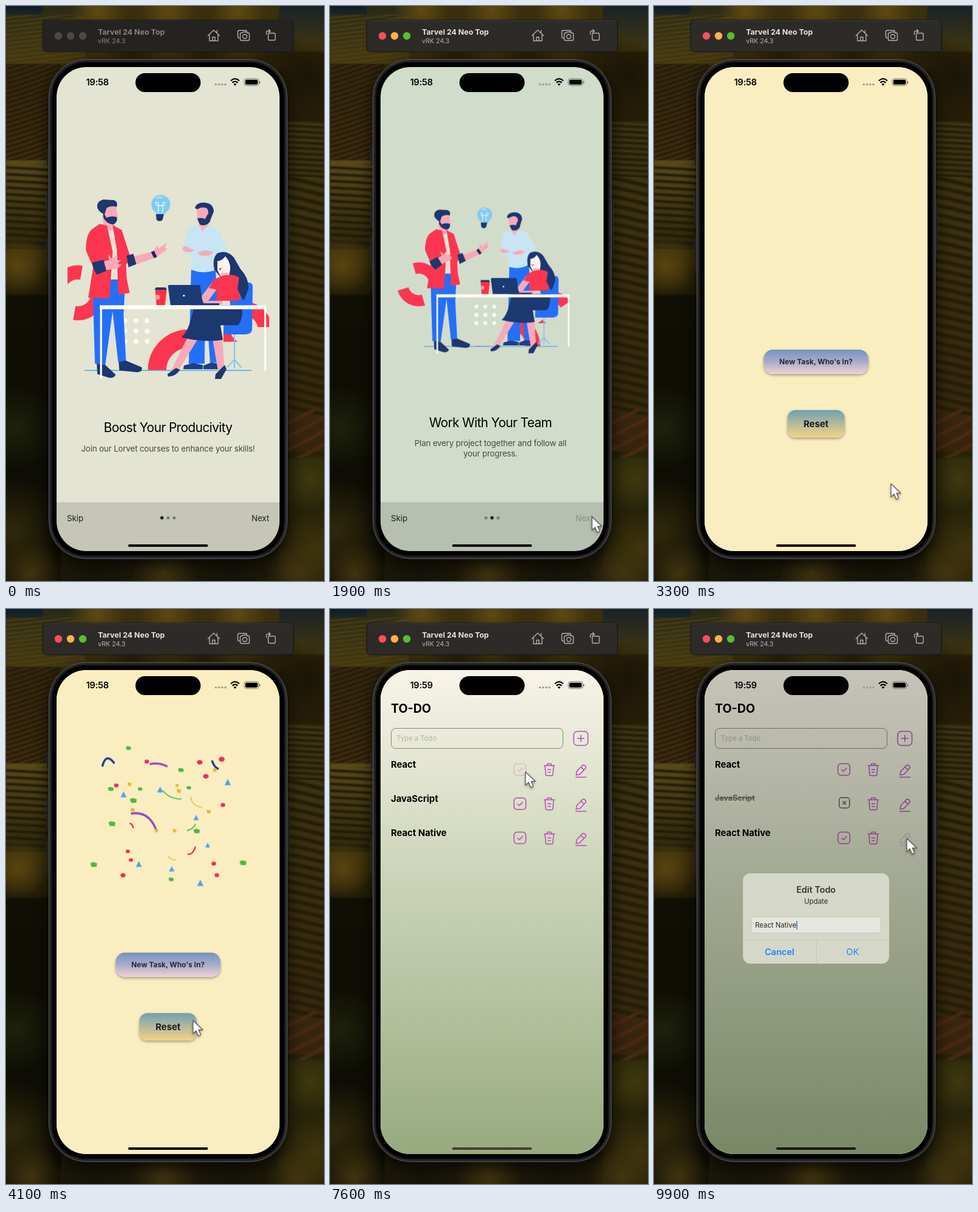
Write an HTML page with a canvas that moves like this. It is 522x942 px and loops after 10000 ms.

```html
<!DOCTYPE html>
<html lang="en">
<head>
<meta charset="utf-8">
<title>Onboarding and to-do app demo</title>
<style>
html, body { margin: 0; width: 100%; height: 100%; overflow: hidden; background: #0d0f05 }
canvas, svg { position: absolute; left: 0; top: 0; display: block }
text { font-family: Inter, "Open Sans", sans-serif }
.mid { text-anchor: middle }
.b { font-weight: 700 }
.s { font-weight: 600 }
.h1 { font-size: 20.8px; letter-spacing: -.6px }
.sub { font-size: 13.2px; letter-spacing: -.12px; fill: #45473f }
.nav { font-size: 13.2px; fill: #1e1f1b }
.item { font-size: 14.8px; font-weight: 700 }
.ico { fill: none; stroke: #b04db2; stroke-width: 1.5; stroke-linecap: round; stroke-linejoin: round }
.tool { fill: none; stroke: #b3b0ab; stroke-width: 1.4; stroke-linejoin: round; stroke-linecap: round }
.anim, .bit { animation: 10s linear infinite }
.step { animation: 10s step-end infinite }

.idle { animation-name: idle }
.live { animation-name: live }
@keyframes idle { 0% { opacity: 1 } 9%, 100% { opacity: 0 } }
@keyframes live { 0% { opacity: 0 } 9%, 100% { opacity: 1 } }

.pages { animation-name: pages; animation-timing-function: ease-in-out }
.tone { animation-name: tone }
.dot { animation-name: dot }
.skip { animation-name: skip }
.next { animation-name: next }
.done { animation-name: done }
@keyframes pages {
  0%, 12.39% { transform: none }
  15.89%, 18.8% { transform: translate(-366px) }
  22.3%, 100% { transform: translate(-732px) }
}
@keyframes tone { 0%, 13.2% { fill: #e3e4d2 } 16%, 19.2% { fill: #d2dccb } 22.3%, 100% { fill: #adc5af } }
@keyframes dot { 0% { transform: none } 15% { transform: translate(10px) } 21%, 100% { transform: translate(20px) } }
@keyframes skip { 0% { opacity: 1 } 21%, 100% { opacity: 0 } }
@keyframes next { 0% { opacity: 1 } 12.2% { opacity: .3 } 14% { opacity: 1 } 18.6% { opacity: .3 } 20% { opacity: 1 } 21%, 100% { opacity: 0 } }
@keyframes done { 0% { opacity: 0 } 21% { opacity: 1 } 26.6% { opacity: .3 } 28%, 100% { opacity: 1 } }

.ring { animation-name: ring; transform-origin: 118px 470px }
.arch { animation-name: arch; transform-origin: 300px 597px }
.curl { animation-name: curl; transform-origin: 391px 530px }
.bulb { animation-name: bulb }
.arm { animation-name: arm; transform-origin: 205px 418px }
.hand { animation-name: hand; transform-origin: 150px 428px }
.lean { animation-name: lean; transform-origin: 325px 450px }
.grid { animation-name: grid }
@keyframes ring { to { transform: rotate(333deg) } }
@keyframes arch { 13% { transform: rotate(85deg) } 24% { transform: rotate(95deg) } 34%, 100% { transform: rotate(180deg) } }
@keyframes curl { 13% { transform: rotate(105deg) } 24%, 100% { transform: rotate(180deg) } }
@keyframes bulb { 13% { transform: translate(1px, 13px) } 24% { transform: translate(-2px, -6px) } 34%, 100% { transform: none } }
@keyframes arm { 13% { transform: rotate(-17deg) } 24% { transform: rotate(3deg) } 34%, 100% { transform: none } }
@keyframes hand { 13% { transform: rotate(-5deg) } 24% { transform: rotate(-24deg) } 34%, 100% { transform: none } }
@keyframes lean { 13% { transform: rotate(-6deg) } 24% { transform: rotate(-5deg) } 34%, 100% { transform: none } }
@keyframes grid { 13% { transform: translate(38px) } 24%, 100% { transform: translate(44px) } }

.intro { animation-name: intro }
.home { animation-name: home }
.todo { animation-name: todo }
.intro, .home, .todo { animation-timing-function: cubic-bezier(.2, .8, .3, 1) }
@keyframes intro { 0%, 28% { transform: none } 32.5%, 100% { transform: translate(-110px) } }
@keyframes home { 0%, 28% { transform: translate(366px) } 32.5%, 52% { transform: none } 56.5%, 100% { transform: translate(-110px) } }
@keyframes todo { 0%, 52% { transform: translate(366px) } 56.5%, 100% { transform: none } }

.bit { animation-name: fly }
.ribbons { animation-name: spread }
.bit, .ribbons { animation-timing-function: ease-out }
@keyframes fly {
  0%, 33% { transform: scale(0); opacity: 0 }
  34% { opacity: 1 }
  41% { transform: translate(var(--x), var(--y)); opacity: 1 }
  45% { opacity: 1 }
  48%, 100% { transform: translate(calc(var(--x) * 1.12), calc(var(--y) * 1.1 + 45px)); opacity: 0 }
}
@keyframes spread {
  0%, 33% { transform: scale(0); opacity: 0 }
  34% { opacity: 1 }
  41% { transform: none; opacity: 1 }
  45% { opacity: 1 }
  48%, 100% { transform: translate(0, 45px) scale(1.12); opacity: 0 }
}

.t1 { animation-name: t1 }
.t2 { animation-name: t2 }
.bar { animation-name: bar }
@keyframes t1 { 0% { opacity: 1 } 65%, 100% { opacity: 0 } }
@keyframes t2 { 0% { opacity: 0 } 65%, 100% { opacity: 1 } }
@keyframes bar { 0% { fill: #000 } 54% { fill: #463e33 } 95%, 100% { fill: #1a1712 } }

.open0 { animation-name: open0 }
.open1 { animation-name: open1 }
.over0 { animation-name: over0 }
.over1 { animation-name: over1 }
.tap0 { animation-name: tap0 }
.edit2 { animation-name: edit2 }
@keyframes open0 { 0% { opacity: 1 } 77% { opacity: 0 } 82%, 100% { opacity: 1 } }
@keyframes over0 { 0% { opacity: 0 } 77% { opacity: 1 } 82%, 100% { opacity: 0 } }
@keyframes open1 { 0% { opacity: 1 } 87%, 100% { opacity: 0 } }
@keyframes over1 { 0% { opacity: 0 } 87%, 100% { opacity: 1 } }
@keyframes tap0 { 0% { opacity: 1 } 75.5% { opacity: .25 } 77%, 100% { opacity: 1 } }
@keyframes edit2 { 0% { opacity: 1 } 94%, 100% { opacity: .3 } }

.dim { animation-name: dim }
.alert { animation-name: alert; transform-origin: 266px 507px }
@keyframes dim { 0%, 94.5% { opacity: 0 } 96.5%, 100% { opacity: 1 } }
@keyframes alert { 0%, 94.5% { opacity: 0; transform: scale(1.15) } 96.5%, 100% { opacity: 1; transform: none } }

.cursor { animation-name: cursor; animation-timing-function: ease-in-out }
@keyframes cursor {
  0%, 7% { transform: translate(530px, 935px) }
  11%, 13% { transform: translate(433px, 835px) }
  20%, 29% { transform: translate(430px, 837px) }
  39%, 42% { transform: translate(307px, 674px) }
  48%, 66% { transform: translate(288px, 571px) }
  71%, 81.5% { transform: translate(321px, 267px) }
  85%, 88% { transform: translate(320px, 320px) }
  92.5%, 100% { transform: translate(415px, 376px) }
}
</style>
</head>
<body>
<canvas id="wall" width="522" height="942"></canvas>
<svg width="522" height="942" viewBox="0 0 522 942">
<defs>
  <clipPath id="screen"><rect x="83" y="100" width="366" height="793" rx="49"/></clipPath>
  <clipPath id="crop"><rect x="101" y="280" width="331" height="340"/></clipPath>
  <clipPath id="floor"><rect x="200" y="500" width="240" height="97"/></clipPath>
  <clipPath id="seat"><path d="M357 480H440V526H405V550H357Z"/></clipPath>
  <linearGradient id="sky" x2="0" y2="1">
    <stop stop-color="#f8f4e8"/><stop offset=".4" stop-color="#ced6bb"/>
    <stop offset=".75" stop-color="#afbd99"/><stop offset="1" stop-color="#98a97f"/>
  </linearGradient>
  <linearGradient id="task" x2="0" y2="1"><stop stop-color="#7394bf"/><stop offset=".5" stop-color="#a9acca"/><stop offset="1" stop-color="#efd3d4"/></linearGradient>
  <linearGradient id="reset" x2="0" y2="1"><stop stop-color="#6ca2b2"/><stop offset=".55" stop-color="#bdbb98"/><stop offset="1" stop-color="#f2d488"/></linearGradient>
  <filter id="drop" x="-20%" y="-20%" width="140%" height="160%"><feDropShadow dx="0" dy="2" stdDeviation="2" flood-opacity=".35"/></filter>
</defs>

<!-- simulator toolbar -->
<rect x="60" y="23" width="412" height="52" rx="6" fill="#2d2b28" stroke="#11100e"/>
<path d="M65 24H467" stroke="#4a4844" stroke-width=".8"/>
<g class="step idle">
  <rect x="60.5" y="23.5" width="411" height="51" rx="6" fill="#242321"/>
  <g fill="#4b4a48"><circle cx="86" cy="49" r="6.200"/><circle cx="106" cy="49" r="6.200"/><circle cx="126" cy="49" r="6.200"/></g>
</g>
<g class="step live">
  <circle cx="86" cy="49" r="6.200" fill="#fd4f5b"/><circle cx="106" cy="49" r="6.200" fill="#fdb04c"/><circle cx="126" cy="49" r="6.200" fill="#58bc36"/>
</g>
<g id="label">
  <text class="b" x="151" y="47" font-size="12.4">Tarvel 24 Neo Top</text>
  <text x="151" y="61" font-size="10.6">vRK 24.3</text>
</g>
<g class="tool">
  <path d="M331.5 48.500L341 39.500L350.500 48.500M334 47V57H348V47M346.500 43.500V40M339 57V51H343V57"/>
  <path d="M383 52.500Q380.500 52.500 380.500 50V42.500Q380.500 40 383 40H393Q395.500 40 395.500 42"/>
  <path d="M384.500 46Q384.500 44 386.500 44H388L389.500 42.500H394L395.500 44H397.500Q399.500 44 399.500 46V54Q399.500 56.500 397.500 56.500H386.500Q384.500 56.500 384.500 54Z"/><circle cx="392" cy="50" r="3.500"/>
  <rect x="430.500" y="44.500" width="11.500" height="11.500" rx="1.500"/><path d="M427.500 46.500V43Q427.500 41 430 41H434M431.500 38.500L434 41L431.500 43.500"/>
</g>

<!-- phone body -->
<g fill="#1c1c1c" stroke="#3a3a38" stroke-width=".6">
  <rect x="67" y="234" width="5" height="28" rx="1.500"/><rect x="67" y="304" width="5" height="56" rx="1.500"/><rect x="67" y="377" width="5" height="55" rx="1.500"/><rect x="460" y="318" width="5" height="84" rx="1.500"/>
</g>
<rect x="70.500" y="87.500" width="391" height="818" rx="61" fill="#242425" stroke="#5c5c5b"/>
<rect x="73" y="90" width="386" height="813" rx="58" fill="#151516" stroke="#353536"/>
<rect x="76" y="93" width="380" height="807" rx="55"/>

<g clip-path="url(#screen)">
  <g class="anim intro">
    <rect class="anim tone" x="83" y="100" width="480" height="793" fill="#e3e4d2"/>
    <g class="anim pages">
      <g>
        <g clip-path="url(#crop)"><g class="slot"><g id="art">
          <g fill="none" stroke="#fc3650">
            <g class="anim ring"><circle cx="118" cy="470" r="33.500" stroke-width="23" pathLength="360" stroke-dasharray="90" transform="rotate(10 118 470)"/></g>
            <g clip-path="url(#floor)"><g class="anim arch"><circle cx="300" cy="597" r="52" stroke-width="30" pathLength="360" stroke-dasharray="90"/></g></g>
            <g clip-path="url(#seat)"><g class="anim curl"><path d="M391 496A34 34 0 0 1 425 530M391 564A34 34 0 0 1 357 530" stroke-width="23"/></g></g>
          </g>
          <path d="M129 597H403" stroke="#4ba8ef" stroke-width="1.500"/>
          <!-- bulb -->
          <g class="anim bulb">
            <circle cx="254" cy="325" r="15.500" fill="#82cbef"/><path d="M246 338H262L259 343H248Z" fill="#82cbef"/>
            <path d="M246 341H259L257 350Q252 355 247 350Z" fill="#1d376f"/>
            <path d="M250 339V327Q245 327 246 322Q250 319 251 327H256Q257 319 261 322Q262 327 257 327V339M247 315Q251 312 257 314" fill="none" stroke="#e6f6fd" stroke-width="1.300"/>
          </g>
          <!-- standing colleague -->
          <path d="M304 430H344L352 584H335L327 470L326 586H300Z" fill="#246ff8"/>
          <path d="M291 595L292 589L307 585L323 588V595ZM324 595V589L337 584L352 586V595Z" fill="#1c3f86"/>
          <g class="anim lean">
            <path d="M301 362Q318 357 335 360Q349 364 353 376L363 399Q362 408 352 411L343 433Q324 440 304 432L305 410Q289 405 290 398L297 372Z" fill="#c7e5f3"/>
            <path d="M316 358L322 370L333 358" fill="#f8b5c0"/>
            <path d="M290 399Q289 393 296 394L309 400L304 403H294ZM314 404L328 400L341 403L333 409H320Z" fill="#f8a9b7"/>
            <path d="M313 331L336 328V352L330 361H320L314 351Z" fill="#f8a9b7"/>
            <path d="M310 331Q312 322 325 322Q341 323 341 337L336 349L332 342Q333 334 329 331Q321 328 314 333Z" fill="#1d376f"/>
            <path d="M314 348Q321 346 327 349L331 341L337 345L335 353Q328 362 318 358Z" fill="#1d376f"/>
          </g>
          <!-- chair -->
          <path d="M375 536V579L363 592M375 579L386 592M375 572V594" fill="none" stroke="#84c7f0" stroke-width="2.200"/>
          <path d="M365 453H398Q405 453 405 460L404 530Q403 538 392 538H357V523H371Z" fill="#246ff8"/>
          <!-- seated colleague -->
          <path d="M347 405Q363 399 374 412Q379 421 385 431Q399 446 398 463L391 482L381 460L352 444L342 432Q338 413 347 405Z" fill="#1d376f"/>
          <path d="M347 418Q355 417 360 410Q369 420 368 431L366 444H353L347 433Z" fill="#fff3ee"/>
          <path d="M349 430L355 429L351 433Z" fill="#fc3650"/>
          <path d="M353 437H365V447H352Z" fill="#f8b5c0"/>
          <path d="M339 452L320 477L326 489H355V483H332L346 464Z" fill="#f8a9b7"/>
          <path d="M342 448L355 442Q373 438 383 445Q391 455 388 469L382 483H345L346 465L333 462Z" fill="#fc3650"/>
          <path d="M383 443L398 455L389 482L380 464Z" fill="#1d376f"/>
          <path d="M298 543L314 547L281 600L268 603ZM339 544H355L359 598L349 604Z" fill="#f8a9b7"/>
          <path d="M279 593L286 596Q277 608 266 607L265 603ZM344 603L359 588L362 595L353 611H343Z" fill="#1d376f"/>
          <path d="M310 490H387Q390 512 381 523L352 523L356 547Q327 552 288 543Q299 533 304 511Z" fill="#1d376f"/>
          <!-- desk -->
          <g class="anim grid" id="grid" fill="#fafaf2"></g>
          <path d="M245 464H264L261 490H247Z" fill="#fb3146"/><path d="M244 465L246 461H262L264 465Z" fill="#1d376f"/><circle cx="249" cy="477" r="4" fill="#f99aa5"/>
          <path d="M266 459Q266 457 269 457H316Q319 457 319 460L323 487H350V490H270Z" fill="#1c3a74"/><circle cx="292" cy="474.500" r="1.600" fill="#fff"/>
          <!-- presenter -->
          <path d="M142 447H196L193 505L197 582L184 583L175 500L163 588L146 586L144 520Z" fill="#246ff8"/>
          <path d="M149 586L163 588L180 604Q178 610 169 609L150 603ZM185 583L197 581L223 592Q225 599 215 600L186 597Z" fill="#1d376f"/>
          <path d="M166 361H183L187 448H171Z" fill="#e9e2d1"/>
          <path d="M158 343H176L179 364L172 368L160 360Z" fill="#f8a9b7"/>
          <path d="M154 357L166 360L175 402L170 479L135 478L143 428L131 400Q131 373 142 365ZM175 359L190 367L205 414L197 424L198 446L203 470L184 473L182 400Z" fill="#fc3650"/>
          <path d="M156 328H180L184 345L178 354H164Z" fill="#f8a9b7"/>
          <path d="M150 331Q148 320 160 317L177 318Q184 320 182 329Q172 326 165 331L162 341Q154 339 150 331Z" fill="#1d376f"/>
          <path d="M159 337L165 347Q173 343 182 346Q184 354 176 358Q165 357 160 347Z" fill="#1d376f"/>
          <g class="anim hand">
            <path d="M157 420L169 416L168 407L174 414L182 409L180 417L189 416L183 422L190 424L183 430L168 432L158 434Z" fill="#f8a9b7"/>
            <path d="M142 420L160 416L165 434L149 440Q142 430 142 420Z" fill="#1d376f"/>
          </g>
          <g class="anim arm">
            <path d="M207 411L241 402L249 392L251 397L264 387L261 395L264 399L246 412L212 424Z" fill="#f8a9b7"/>
            <path d="M238 403L243 401L248 411L243 413Z" fill="#1b2852"/>
            <path d="M198 409L209 406L214 423L201 428Z" fill="#1d376f"/>
          </g>
          <path d="M154 493.500H427" stroke="#fffdf6" stroke-width="6.500"/><path d="M156 493V611M425.500 493V598" stroke="#fffdf6" stroke-width="3.200"/>
        </g></g></g>
        <text class="mid h1" x="266" y="698">Boost Your Producivity</text>
        <text class="mid sub" x="266" y="729.500">Join our Lorvet courses to enhance your skills!</text>
      </g>
      <g transform="translate(366)">
        <g class="slot" transform="translate(53.800 80) scale(.8)"></g>
        <text class="mid h1" x="266" y="690">Work With Your Team</text>
        <text class="mid sub" x="266" y="721">Plan every project together and follow all</text>
        <text class="mid sub" x="266" y="737.500">your progress.</text>
      </g>
      <g transform="translate(732)">
        <g class="slot" transform="translate(53.800 80) scale(.8)"></g>
        <text class="mid h1" x="266" y="690">Reach Higher Goals</text>
        <text class="mid sub" x="266" y="721">Utilize our platform to achieve your profssional</text>
        <text class="mid sub" x="266" y="737.500">aspirations.</text>
      </g>
    </g>
    <rect x="83" y="813" width="480" height="80" opacity=".128"/>
    <g fill="#7d8077"><circle cx="256" cy="838.500" r="2.600"/><circle cx="266" cy="838.500" r="2.600"/><circle cx="276" cy="838.500" r="2.600"/></g>
    <circle class="step dot" cx="256" cy="838.500" r="2.700" fill="#22231f"/>
    <text class="nav step skip" x="100" y="843.500">Skip</text>
    <text class="nav step next" x="403" y="843.500">Next</text>
    <text class="nav step done" x="403" y="843" style="font-size:12.200px">Done</text>
  </g>

  <g class="anim home">
    <rect x="83" y="100" width="480" height="793" fill="#faedc0"/>
    <g transform="translate(265 340)" id="confetti">
      <g class="anim ribbons"><g transform="translate(-265 -340)" fill="none" stroke-width="3">
        <path d="M158 258Q164 234 178 253M338 248Q342 260 349 262" stroke="#1d3f9f" stroke-width="3.500"/>
        <path d="M236 254Q252 251 265 258M205 335Q235 330 247 363" stroke="#9a4cc4" stroke-width="3.500"/>
        <path d="M257 297Q268 311 288 311M297 363Q308 360 311 352" stroke="#5cc552" stroke-width="2"/>
        <path d="M303 307Q304 322 322 325M265 404Q271 411 280 411" stroke="#efc445" stroke-width="1.800"/>
        <path d="M203 351Q208 352 209 359M298 401Q306 404 311 389" stroke="#ee3358" stroke-width="2.400"/>
      </g></g>
    </g>
    <rect x="180" y="563" width="172" height="40" rx="15" fill="url(#task)" filter="url(#drop)"/>
    <text class="mid b" x="266" y="587" font-size="11.900" fill="#26283a">New Task, Who's In?</text>
    <rect x="219" y="662" width="94" height="45" rx="13" fill="url(#reset)" filter="url(#drop)"/>
    <text class="mid b" x="266" y="690" font-size="14.800" fill="#151b24">Reset</text>
  </g>

  <g class="anim todo">
    <rect x="83" y="100" width="366" height="793" fill="url(#sky)"/>
    <text class="b" x="100" y="169.500" font-size="19.600">TO-DO</text>
    <rect x="100.500" y="195.500" width="282" height="33" rx="7.500" fill="none" stroke="#85867a"/>
    <text x="109.500" y="216" font-size="11.200" fill="#b0b3a1">Type a Todo</text>
    <g class="ico" stroke-width="1.800"><rect x="400" y="200.500" width="23.500" height="23" rx="6"/><path d="M406.500 212H417M411.750 206.750V217.250"/></g>
    <g id="rows"></g>
  </g>
  <rect class="anim dim" x="83" y="100" width="366" height="793" fill="rgba(0,0,0,.2)"/>

  <g class="anim alert">
    <rect x="146" y="433" width="240" height="148" rx="12" fill="#d5d7c9"/>
    <text class="mid s" x="266" y="465" font-size="14.300" fill="#33342f">Edit Todo</text>
    <text class="mid" x="266" y="483" font-size="11.400" fill="#2b2c28">Update</text>
    <rect x="159.500" y="504.500" width="213" height="26.500" rx="5.500" fill="#e5e7df" stroke="#c3c5b9"/>
    <text x="166" y="522" font-size="11.300" fill="#24251f">React Native</text>
    <path d="M234.500 511V525" stroke="#3b6bd8" stroke-width="1.500"/>
    <path d="M146 542H386M266.500 542V581" stroke="#bfc2b3" stroke-width=".8"/>
    <g font-size="14.500" fill="#1d86f6"><text class="mid s" x="206" y="567">Cancel</text><text class="mid" x="326" y="567">OK</text></g>
  </g>

  <!-- status bar -->
  <g class="s" font-size="14.600" letter-spacing="-.3"><text class="step t1" x="131.500" y="130">19:58</text><text class="step t2" x="131.500" y="130">19:59</text></g>
  <rect x="212.500" y="110" width="107" height="31" rx="15.500"/>
  <g fill="#9b9b91"><circle cx="344.500" cy="128.500" r="1.700"/><circle cx="349.700" cy="128.500" r="1.700"/><circle cx="354.900" cy="128.500" r="1.700"/><circle cx="360.100" cy="128.500" r="1.700"/></g>
  <path d="M369 122.500Q376 115.800 383 122.500M371.600 125.600Q376 121.500 380.400 125.600" fill="none" stroke="#000" stroke-width="2.200"/><path d="M373.500 128Q376 126 378.500 128L376 130.800Z"/>
  <rect x="391" y="119" width="24" height="11.500" rx="3.800" fill="none" stroke="#77776e"/><rect x="392.700" y="120.700" width="20.600" height="8.100" rx="2.400"/><path d="M416.500 123V127" stroke="#77776e" stroke-width="1.500"/>
  <rect class="step bar" x="200.500" y="882" width="131" height="4" rx="2"/>
</g>

<g class="anim cursor"><path d="M0 0V21.500L5 17L8.700 25.300L12.700 23.500L9.100 15.500H16Z" fill="#fff" stroke="#5b5955" stroke-width="1.300" stroke-linejoin="round" filter="url(#drop)"/></g>
</svg>

<script>
const $ = id => document.getElementById(id);
const add = (el, html) => el.insertAdjacentHTML('beforeend', html);

// toolbar label in its two states
const label = $('label');
const lit = label.cloneNode(true);
label.setAttribute('class', 'step idle');
label.setAttribute('fill', '#858481');
lit.removeAttribute('id');
lit.setAttribute('class', 'step live');
lit.setAttribute('fill', '#e6e4e1');
lit.lastElementChild.setAttribute('fill', '#b5b3af');
label.after(lit);

// desk dots, then the same scene on every page
for (let i = 0; i < 9; i++) add($('grid'), `<circle cx="${195 + i % 3 * 18.3}" cy="${515.5 + Math.floor(i / 3) * 17}" r="4"/>`);
document.querySelectorAll('.slot:empty').forEach(slot => {
  const copy = $('art').cloneNode(true);
  copy.removeAttribute('id');
  copy.querySelector('#grid').removeAttribute('id');
  slot.append(copy);
});

// confetti
const bits = [
  ['#ea2f5d', '<ellipse rx="4.200" ry="3.600"/>', [181,289, 231,250, 318,251, 354,246, 328,274, 356,321, 200,397, 205,411, 192,436, 341,417, 346,436]],
  ['#4cb83f', '<path d="M-5 -2L-1 -4L5 -2L4 3L-3 3Z"/>', [201,228, 287,264, 172,295, 220,295, 300,293, 209,314, 174,352, 313,364, 144,419, 389,416, 271,443]],
  ['#e9b739', '<path d="M-3 -3L3 -2L2 3L-3 2Z"/>', [203,287, 281,289, 284,298, 343,264, 333,332, 277,363, 247,363, 208,329]],
  ['#4aa5ea', '<path d="M0 -5L4.500 4H-4.500Z"/>', [193,304, 253,296, 364,284, 312,342, 331,387, 218,418, 272,426, 319,449]]
];
for (const [color, shape, at] of bits)
  for (let i = 0; i < at.length; i += 2) {
    const size = 0.8 + (at[i] % 5) * 0.09;
    add($('confetti'), `<g class="bit" fill="${color}" style="--x:${at[i] - 265}px;--y:${at[i + 1] - 340}px"><g transform="scale(${size})">${shape}</g></g>`);
  }

// to-do rows
['React', 'JavaScript', 'React Native'].forEach((name, i) => add($('rows'), `
<g transform="translate(0 ${i * 56})">
  <g class="step open${i}"><text class="item" x="100" y="260">${name}</text>
    <g class="ico step tap${i}"><rect x="302" y="253.500" width="19.500" height="19" rx="5"/><path d="M308 263.500L311 266L316 260.500"/></g></g>
  <g class="step over${i}" opacity="0"><text class="b" x="100" y="257.500" font-size="12.500" fill="#6d6a60" text-decoration="line-through">${name}</text>
    <g class="ico" style="stroke:#5a5950"><rect x="304" y="253" width="17" height="17" rx="4"/><path d="M310 259L315 264M315 259L310 264"/></g></g>
  <g class="ico"><path d="M351.500 256.500H368.500M356 256.500L357 253.500H363L364 256.500M353 257L354 271Q354.200 273 356 273H364Q365.800 273 366 271L367 257M357.500 263H362.500M358 267.500H362"/></g>
  <g class="ico step edit${i}"><path d="M404 272L405 266L414 256.500Q416.500 254.500 419 257Q421 259.500 419 261.500L410 271ZM412.500 258.500Q413.500 262 417.500 263M403.500 275.500H420.500"/></g>
</g>`));

// wallpaper: soft fields, vine rows and tree tops
const c = $('wall').getContext('2d');
function strip(x, y, w, h, from, to) {
  const g = c.createLinearGradient(0, y, 0, y + h);
  g.addColorStop(0, from);
  g.addColorStop(1, to);
  c.fillStyle = g;
  c.fillRect(x, y, w, h);
}
function rows(x, y, w, h, gap, slope, color, width) {
  c.save();
  c.beginPath(); c.rect(x, y, w, h); c.clip();
  c.strokeStyle = color; c.lineWidth = width;
  c.beginPath();
  const rise = slope * w;
  for (let v = y - Math.abs(rise); v < y + h + Math.abs(rise); v += gap) {
    c.moveTo(x, v);
    c.quadraticCurveTo(x + w / 2, v + rise * .4, x + w, v + rise);
  }
  c.stroke();
  c.restore();
}
function tree(x, y, r, color) {
  const g = c.createRadialGradient(x, y, 0, x, y, r);
  g.addColorStop(0, color);
  g.addColorStop(1, color + '00');
  c.fillStyle = g;
  c.fillRect(x - r, y - r, 2 * r, 2 * r);
}
c.filter = 'blur(1px)';
strip(0, 0, 522, 942, '#3a300e', '#1c1808');
strip(0, 0, 130, 95, '#2a2a18', '#45380f');
rows(0, 14, 130, 80, 7, -.12, '#524517', 2);
strip(0, 0, 60, 14, '#0d1c30', '#1c2622');
strip(0, 95, 90, 158, '#34280d', '#432d10');
rows(0, 95, 90, 158, 8, -.35, '#221a09', 3);
strip(0, 253, 90, 145, '#5a4a18', '#2c260b');
rows(0, 259, 90, 139, 11, .06, '#1f1b0a', 4);
strip(0, 398, 90, 75, '#3d300a', '#211c08');
strip(0, 473, 90, 469, '#100f05', '#0d0d05');
strip(448, 0, 74, 75, '#1b2228', '#40360f');
strip(448, 75, 74, 115, '#2a2008', '#251d08');
strip(448, 190, 74, 540, '#403612', '#38240d');
rows(448, 190, 74, 90, 9, .05, '#211d0a', 4);
rows(448, 280, 74, 390, 15, .22, '#221f09', 6);
rows(448, 660, 74, 80, 22, -.5, '#4a2913', 6);
strip(448, 740, 74, 202, '#2a270b', '#211d09');
for (let i = 0; i < 6; i++) tree(150 + i * 58, 8 + i % 2 * 70, 48, i % 2 ? '#251d08' : '#5e4a12');
tree(492, 115, 60, '#1a1507');
tree(20, 425, 50, '#5a4510');
tree(15, 690, 70, '#1f220b');
tree(10, 860, 90, '#30290b');
tree(500, 775, 55, '#3f390f');
tree(510, 890, 70, '#40350e');
for (let i = 0; i < 5; i++) tree(40 + i * 110, 930, 55, i % 2 ? '#15140a' : '#423510');
c.filter = 'none';
c.shadowColor = 'rgba(0,0,0,.8)';
c.shadowBlur = 28;
c.shadowOffsetY = 8;
c.beginPath();
c.roundRect(71, 88, 390, 817, 60);
c.fillStyle = '#000';
c.fill();
</script>
</body>
</html>
```
